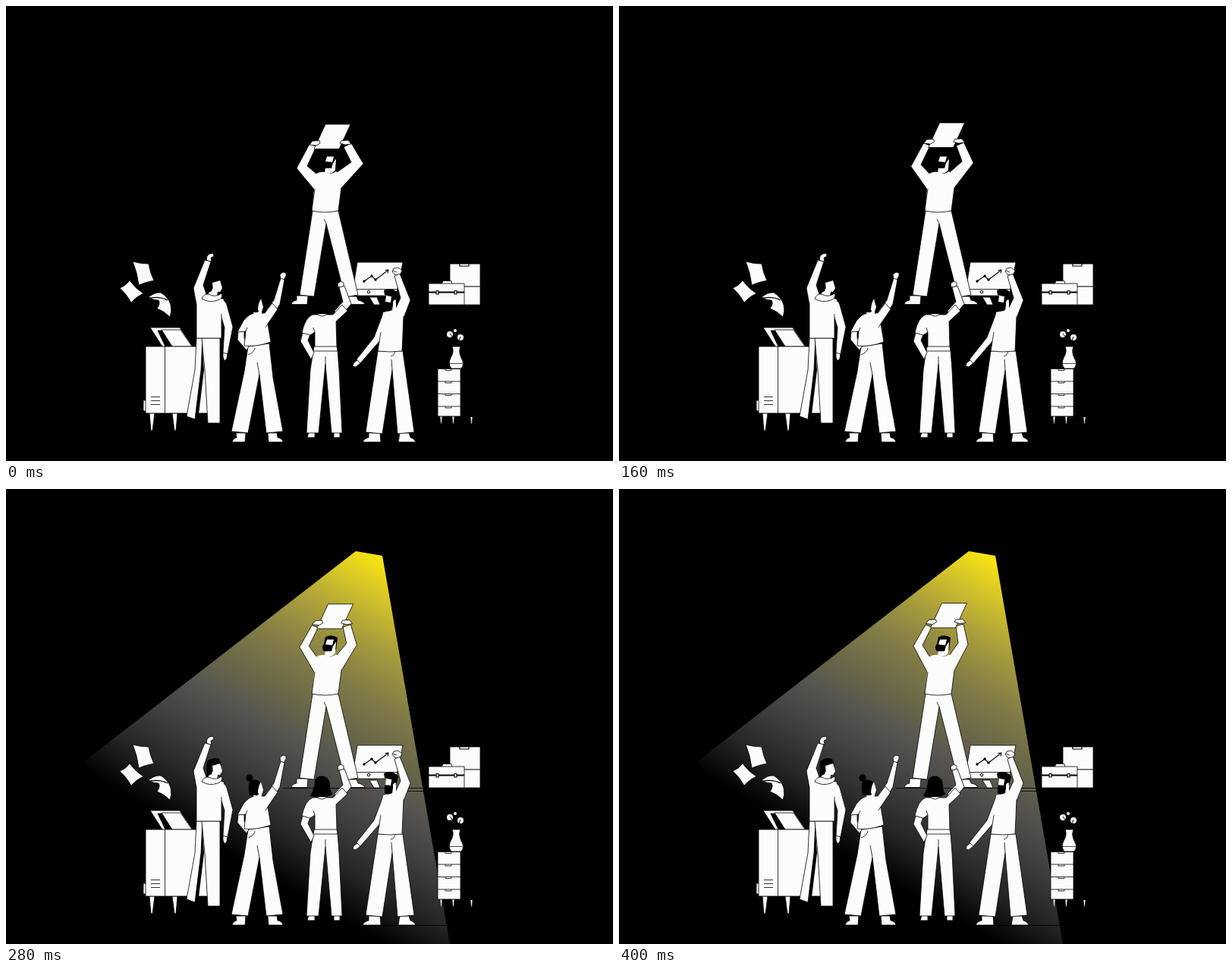
An HTML page with a canvas that plays this animation: 800 by 600 pixels, repeating every 2120 ms.

```html
<!DOCTYPE html>
<html>
<head>
<meta charset="utf-8">
<style>
html, body { margin: 0; width: 100%; height: 100%; overflow: hidden; background: #000; }
canvas { display: block; }
</style>
</head>
<body>
<canvas id="stage" width="800" height="600"></canvas>
<script>
const ctx = document.getElementById('stage').getContext('2d');
const WHITE = '#fcfcfc', BLACK = '#000';
const LOOP = 2120, STEP = 40, RISE = 400, LIGHT_ON = 280;

function shape(d, fill = WHITE, width = .8) {
  const p = new Path2D(d);
  ctx.fillStyle = fill;
  ctx.fill(p);
  if (width) line(p, width);
}

function line(d, width = .8) {
  ctx.strokeStyle = BLACK;
  ctx.lineWidth = width;
  ctx.stroke(d instanceof Path2D ? d : new Path2D(d));
}

function dot(x, y, r, fill = WHITE, width = 0) {
  const p = new Path2D();
  p.arc(x, y, r, 0, Math.PI * 2);
  ctx.fillStyle = fill;
  ctx.fill(p);
  if (width) line(p, width);
}

function beam() {
  const g = ctx.createLinearGradient(480, 85, 262, 463);
  [[0, '#f7e413'], [0.1, '#d5c429'], [0.22, '#aa9f3b'], [0.36, '#837d46'],
   [0.5, '#696649'], [0.6, '#565550'], [0.72, '#414141'], [0.86, '#262626'], [1, '#000']]
    .forEach(s => g.addColorStop(...s));
  shape('M461 82L496 88L585 600H430L250 500L102 360Z', g, 0);
  line('M365 394.5H620M515 398.5H620M300 575.5H600');
}

function papers() {
  shape('M167 337Q177 340 188 340Q190 352 195 362Q184 364 175 368Q173 351 167 337Z');
  shape('M150 372Q158 369 163 362Q171 373 181 379Q172 383 165 391Q159 380 150 372Z');
  shape('M188 384Q196 377 204 378Q214 384 217 394Q219 403 216 410Q208 402 199 399Q204 392 201 388Q194 388 188 384Z');
  line('M190 385Q204 383 213 388', 1.2);
}

function copier() {
  shape('M181 520H185V534H181Z');
  shape('M189 537H196L193 560H191Z');
  shape('M219 537H226L224 560H222Z');
  shape('M190 424H229L246 449H206Z');
  shape('M200 428H207L222 449H210Z', BLACK);
  shape('M205 427H230L245 449H219Z');
  shape('M184 449H266V537H184Z');
  line('M209.5 449V537M191 515.5H203M191 520.5H203M191 525.5H203');
}

function monitor() {
  shape('M479 384H489L493 394H485Z');
  shape('M463 338H523L514 382H456Z');
  line('M457 373.5H516');
  dot(478, 377, 1.8, WHITE, 1);
  line('M472 363L482 356L487 361L504 348M499.5 348.5L504 348L503 352.5', 1.1);
  dot(472, 363, 1.7, BLACK);
  dot(482, 356, 1.7, BLACK);
  dot(487, 361, 1.7, BLACK);
}

function boxes() {
  shape('M585 340H625V370H585Z');
  shape('M585 370H625V394H585Z');
  line('M598 340V343H610V340', 1.2);
  shape('M574 367L576 362.5H587L588 367');
  shape('M557 366H604V394H557Z');
  line('M557 377.5H604', 1.8);
  for (const x of [567, 591]) shape(`M${x} 375.5H${x + 3}V380H${x}Z`, WHITE, 1.2);
}

function dresser() {
  for (const x of [573, 589, 613]) shape(`M${x - 1} 541H${x + 2}L${x + 1} 551H${x}Z`, WHITE, .5);
  ctx.fillStyle = BLACK;
  ctx.fillRect(610, 538, 6, 4);
  shape('M569 478H599V541H569Z');
  for (let i = 0; i < 4; i++) {
    const y = 478.5 + i * 16.5;
    line(`M569 ${y}H599M579 ${y}V${y + 2}H587V${y}`);
  }
  shape('M588 449H599Q596 456 600 464Q605 472 600 478H587Q582 472 586 464Q591 456 588 449Z');
  line('M584 471.5H602', .7);
  dot(585, 433, 4);
  dot(599, 437, 4);
  dot(592, 428, 2);
  line('M585 432L589 437M599 436L597 441', 1);
}

function mix(a, b, p) {
  const q = a.map((v, i) => v + (b[i] - v) * p);
  let d = '';
  for (let i = 0; i < q.length; i += 2) d += (i ? 'L' : 'M') + q[i] + ' ' + q[i + 1];
  return d + 'Z';
}

function presenter(p) {
  shape('M383 382H398L397 393.5H376Q377 389 383 388Z');
  shape('M451 383H462L464 388Q471 389 473 393.5H453Z');
  shape('M404 270L387 381L406 383L422 287L447 384L464 381L438 270Z');
  line('M422 287L419 281');

  shape(mix([400, 182, 383, 214, 407, 243, 410, 222, 397, 211, 409, 185],
            [404, 179, 388, 207, 407, 243, 410, 222, 400, 206, 412, 182], p));
  shape(mix([445, 186, 455, 206, 435, 220, 441, 241, 471, 208, 455, 181],
            [444, 181, 447, 203, 435, 220, 441, 241, 460, 205, 454, 178], p));
  shape('M407 222Q414 218 420 219Q428 224 435 218L442 227V240L438 270Q421 274 403 270L406 243Z', WHITE, 0);
  line('M407 241L403 270Q421 274 438 270L442 239');

  shape('M421 213L434 203V216Q429 223 420 220Z', WHITE, 0);
  shape('M421 195Q429 191 437 196L435 213Q432 205 431 207L429 214H419Q415 209 419 204Z', BLACK, 0);
  shape('M423 198.5H432L430 206L421 205Z', WHITE, 0);
  shape('M432 206Q434 202 435 202L434 214L430 214Z', WHITE, 0);

  ctx.save();
  ctx.translate(4.5 * p, -5.5 * p);
  shape('M421 156H454L439 188.5H406Z');
  shape('M400 183L404 178L413 177.5L414 181L409 184Z');
  ctx.translate(-2.5 * p, 0);
  shape('M455 182L451 177L442 177.5L440 181L447 183Z');
  ctx.restore();
}

function manLeft() {
  shape('M258 438L261 480L254 538L249 545Z', BLACK, 0);
  shape('M251 438L249 480L238 541L249 545L257 480L259 438Z');
  shape('M258 438H282V550H266L262 480Z');
  shape('M265 336Q263 330 268 327L273 326L274 330L270 332L271 337Z');
  shape('M262 335L247 372L251 394L266 386L260 368L270 337Z');
  shape('M286 456L292 457L291 465L288 468L286 463Z');
  shape('M283 387Q289 388 291 394L299 423L292 459L286 457L288 424L283 408Z');
  shape('M251 389Q260 380 270 381L287 387L284 408V438H251Z', WHITE, 0);
  line('M251 392V438H284V406');
  shape('M267 374L280 371L278 383L267 382Z', WHITE, 0);
  shape('M265 379Q264 370 265 359Q272 353 281 356L284 364L273 368L271 376Z', BLACK, 0);
  shape('M272 365L282 362L285 372L282 377L273 376Z', WHITE, 0);
  line('M272 367Q269 369 272 372');
  shape('M258 386Q261 379 267 380Q276 385 284 379Q287 385 279 388Q268 392 258 386Z');
}

function womanBun() {
  shape('M303 563H316L315 575H298Q299 570 304 569Z');
  shape('M345 563H357L358 569Q364 570 365 575H346Z');
  shape('M319 449L314 482L297 561L319 563L334 486L343 563L365 561L352 490L347 445Z');
  line('M334 486L331 470M319 460Q327 457 328 451');
  shape('M306 429L305 440L317 454L320 449L314 438V429Z');
  shape('M362 361L361 354L365 351L369 352L369 356L366 361Z');
  shape('M362 359L353 388L343 401L349 413L361 393L367 361Z');
  shape('M313 415Q320 406 328 405H341L351 392L358 400L345 419L349 443Q330 450 314 448L316 429L305 430Z');
  line('M345 419L342 424M316 429L318 424');
  shape('M326 398H337V405Q331 409 326 405Z', WHITE, 0);
  dot(321, 381, 4.7, BLACK);
  shape('M320 388Q323 382 331 384L337 387L336 396L332 404H321Q319 396 320 388Z', BLACK, 0);
  shape('M336 386L339 397L337 403L332 401Q332 393 336 386Z', WHITE, 0);
}

function womanBob() {
  shape('M399 562H407V569H397Z');
  shape('M432 562H440V569H432Z');
  shape('M405 454L401 480L396 563H412L421 472L429 563H443L439 480L437 454Z');
  line('M421 472V462');
  shape('M391 431L388 442L402 466L406 457L398 441L401 433Z');
  shape('M438 371L437 366L441 363L445 365V370Z');
  shape('M439 371L444 390L433 402L437 414L455 393L446 369Z');
  shape('M404 407H431L443 394L450 402L435 416L436 450H407V430L401 434L390 431Q394 411 404 407Z');
  line('M407 430L405 424');
  shape('M406 449H436L437 455H405Z');
  shape('M410 402H423V406Q416 412 410 406Z');
  shape('M401 405Q407 394 407 384Q411 377 420 379Q427 382 427 391Q427 400 431 402Q424 407 416 406Q407 407 401 405Z', BLACK, 0);
}

function manRight() {
  shape('M478 563H493L494 575H470Q472 570 478 569Z');
  shape('M519 563H531L533 569Q538 570 540 575H517Z');
  shape('M490 455L474 562L496 564L509 480L516 564L538 562L523 455Z');
  line('M509 480L508 466M513 455Q512 461 507 462');
  shape('M464 466L458 471L457 475L461 476L468 470Z');
  shape('M497 405L485 437L462 466L467 471L494 440L500 420Z');
  shape('M512 354L509 350L511 346L517 345L522 349L519 355Z');
  line('M510 349L515 351');
  shape('M512 356L520 385L511 404L523 414L533 388L519 353Z');
  shape('M497 404Q504 401 515 403L521 396L524 409L522 455Q506 457 490 455L494 430Z', WHITE, 0);
  line('M524 409L522 455Q506 457 490 455L494 430');
  shape('M503 395L514 386V402Q508 406 503 402Z', WHITE, 0);
  shape('M498 375Q505 371 513 375L517 379L514 391L511 388L509 401Q502 404 499 401V391L507 390L509 383L499 381Z', BLACK, 0);
  shape('M501 382L508 383L507 391L500 390Z', WHITE, 0);
  shape('M510 390Q512 386 514 388L513 394L510 395Z', WHITE, 0);
}

function draw(t) {
  const u = Math.min(1, t / RISE);
  ctx.fillStyle = BLACK;
  ctx.fillRect(0, 0, 800, 600);
  if (t >= LIGHT_ON) beam();
  papers();
  copier();
  monitor();
  boxes();
  dresser();
  presenter(u * u * (3 - 2 * u));
  manLeft();
  womanBun();
  womanBob();
  manRight();
}

ctx.lineJoin = 'round';
const start = performance.now();
function tick() {
  const t = (performance.now() - start) % LOOP;
  draw(Math.floor(t / STEP) * STEP);
  requestAnimationFrame(tick);
}
tick();
</script>
</body>
</html>
```
